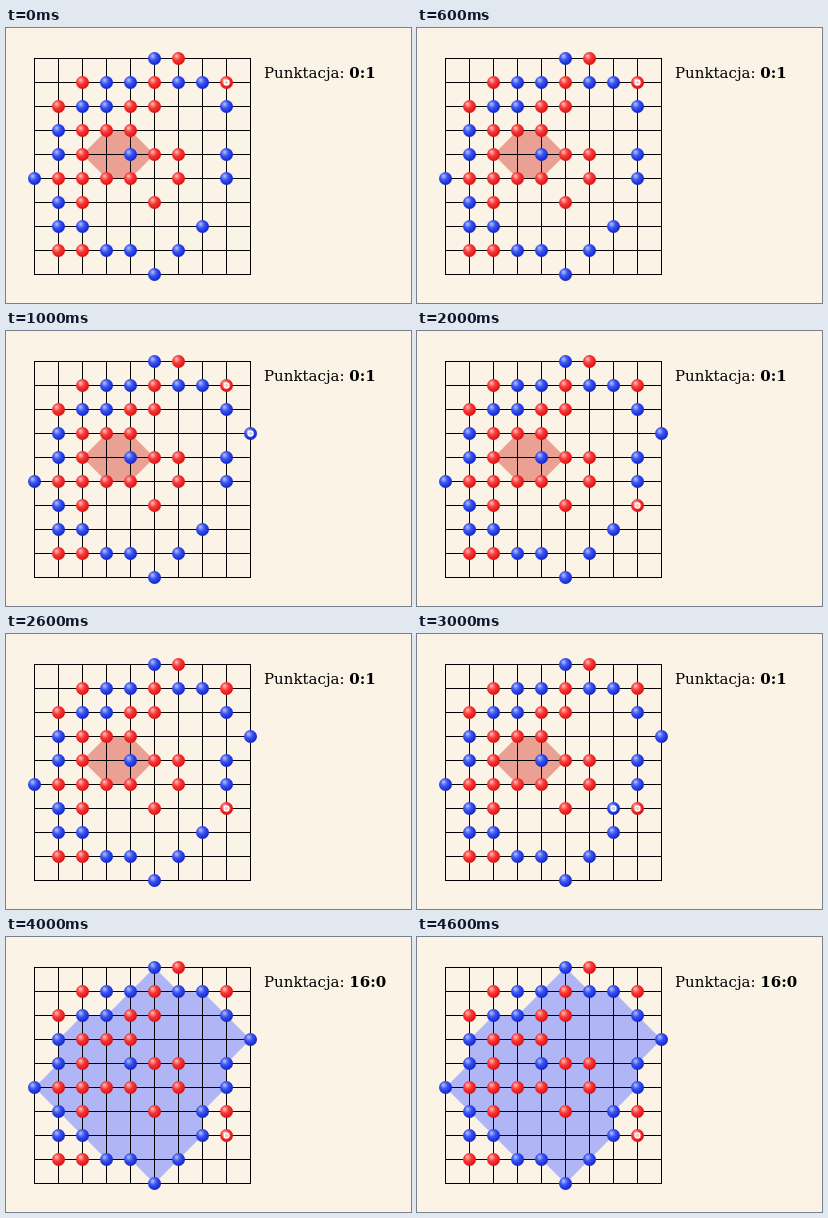
Write an HTML page that moves like this. It is 405 px wide and 275 px high and loops after 5 s.

```html
<!DOCTYPE html>
<html lang="pl">
<head>
<meta charset="utf-8">
<style>
  html, body { margin: 0; width: 100%; height: 100%; overflow: hidden; background: #faf3e6; }
  svg { display: block; }
  text { font: 15px "DejaVu Serif", "Noto Serif", serif; }
  .score { font-weight: bold; }
</style>
</head>
<body>
<svg width="405" height="275" viewBox="0 0 405 275">
  <defs>
    <radialGradient id="r" cx=".42" cy=".4" r=".62" fx=".34" fy=".3">
      <stop offset="0" stop-color="#ffc4c4"/>
      <stop offset=".45" stop-color="#f83c3c"/>
      <stop offset=".8" stop-color="#ea1c1c"/>
      <stop offset="1" stop-color="#c41414"/>
    </radialGradient>
    <radialGradient id="b" cx=".42" cy=".4" r=".62" fx=".34" fy=".3">
      <stop offset="0" stop-color="#b8c4ff"/>
      <stop offset=".45" stop-color="#3c54f0"/>
      <stop offset=".8" stop-color="#1c34dc"/>
      <stop offset="1" stop-color="#1424b0"/>
    </radialGradient>
  </defs>
  <g id="area"></g>
  <path id="grid" stroke="#000" shape-rendering="crispEdges"/>
  <g id="stones"></g>
  <text x="258" y="50">Punktacja: <tspan class="score" id="score"></tspan></text>
</svg>
<script>
const STEP = 1000, STEPS = 5, CELL = 24;
const $ = id => document.getElementById(id);
const px = col => 28.5 + col * CELL;
const py = row => 30.5 + row * CELL;

const board = [
  '.....br...',
  '..rbbrbb..',
  '.rbbrr..b.',
  '.brrr.....',
  '.br.brr.b.',
  'brrrr.r.b.',
  '.br..r....',
  '.bb....b..',
  '.rrbb.b...',
  '.....b....'
];
// One move per step: colour, column, row
const moves = ['r81', 'b93', 'r86', 'b76', 'r87'];
// Enclosures as column-row pairs
const redArea = '24 33 43 54 45 35';
const blueArea = '50 61 71 82 93 84 85 76 77 68 59 48 38 27 16 05 14 13 22 32 41';

const polygon = (pairs, fill) =>
  `<polygon fill="${fill}" points="${pairs.split(' ').map(([c, r]) => px(+c) + ',' + py(+r)).join(' ')}"/>`;

function stone(colour, col, row, marked) {
  const at = `cx="${px(+col)}" cy="${py(+row)}"`;
  const mark = `<circle ${at} r="2.5" fill="${colour === 'r' ? '#ffc8c8' : '#c8d0ff'}" stroke="#fff" stroke-width="1.4"/>`;
  return `<circle ${at} r="6.5" fill="url(#${colour})"/>` + (marked ? mark : '');
}

let lines = '';
for (let i = 0; i < 10; i++) {
  lines += `M${px(i)} 30V247M28 ${py(i)}H245`;
}
$('grid').setAttribute('d', lines);

const fixedStones = board.map((line, row) =>
  [...line].map((c, col) => c === '.' ? '' : stone(c, col, row)).join('')).join('');

function draw(step) {
  const won = step === STEPS - 1;
  $('area').innerHTML = won ? polygon(blueArea, '#b0b5f5') : polygon(redArea, '#eba094');
  $('score').textContent = won ? '16:0' : '0:1';
  // A reply is shown together with the move it answers
  const firstMarked = step - step % 2;
  $('stones').innerHTML = fixedStones +
    moves.slice(0, step + 1).map((move, i) => stone(...move, i >= firstMarked)).join('');
}

const start = performance.now();
let shown = -1;
function tick() {
  const step = Math.floor((performance.now() - start) / STEP) % STEPS;
  if (step !== shown) draw(shown = step);
  requestAnimationFrame(tick);
}
tick();
</script>
</body>
</html>
```
